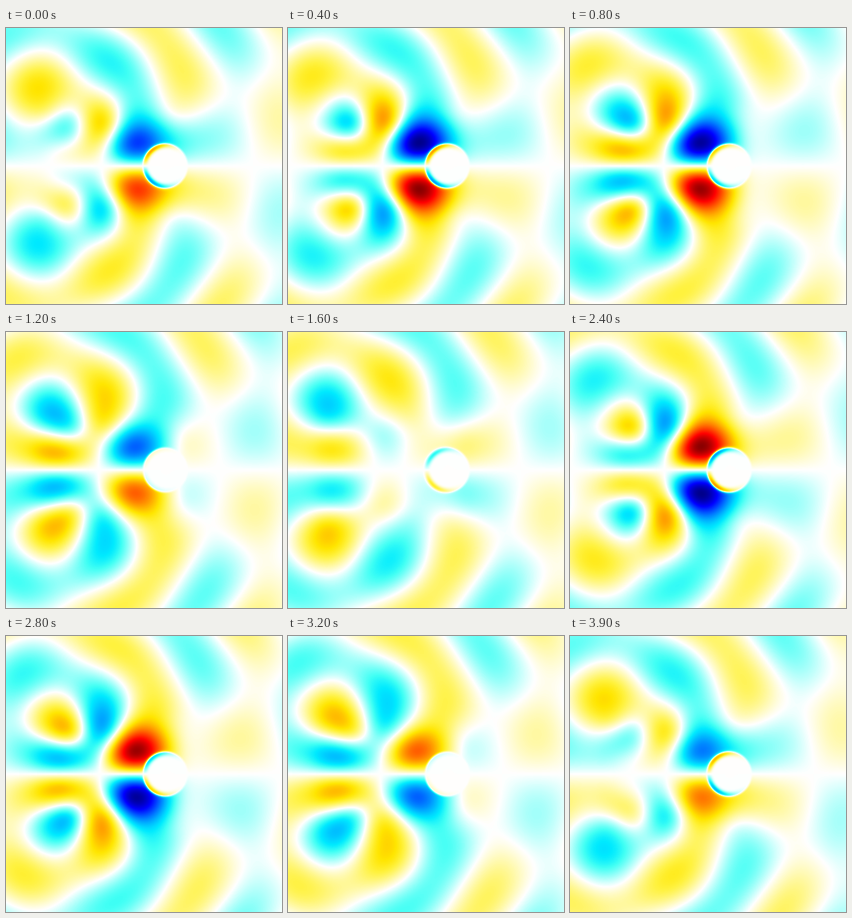
Animation of 400x400 px, one loop 4 s. Source, as a matplotlib script:

```python
import numpy as np
import matplotlib.pyplot as plt
from matplotlib.animation import FuncAnimation
from matplotlib.colors import LinearSegmentedColormap

SIZE = 400
FRAMES = 40
AXIS = 200                      # the field is odd about this row
WAVE_NUMBER = 2 * np.pi / 150
SOURCE_SIZE = 15
LOOSENESS = 0.02
DISC = (231, 200, 31)

# Key points the wave passes through: x, y, amplitude, phase in degrees
KEYS = np.array([
    (175, 170, 1.04, 232), (145, 137, .58, 44), (95, 140, .55, 236),
    (82, 178, .46, 82), (120, 172, .25, 55), (150, 95, .28, 95),
    (195, 125, .22, 222), (62, 90, .27, 330), (15, 175, .18, 115),
    (25, 50, .19, 60), (80, 20, .18, 165), (150, 45, .21, 198),
    (225, 70, .21, 300), (255, 50, .20, 12), (300, 25, .17, 140),
    (285, 155, .12, 145), (345, 135, .10, 268), (385, 120, .085, 10),
])


def wave_from(sx, sy, x, y):
    """Soft circular wave: decays as 1/sqrt(r) away from its source."""
    rho = np.sqrt((x - sx) ** 2 + (y - sy) ** 2 + SOURCE_SIZE ** 2)
    return np.sqrt(SOURCE_SIZE / rho) * np.exp(1j * WAVE_NUMBER * rho)


def odd_wave(sx, sy, x, y):
    return wave_from(sx, sy, x, y) - wave_from(sx, 2 * AXIS - sy, x, y)


def radiated(x, y):
    """Smallest set of source strengths that meets the key points."""
    sources = [(sx, sy) for sx in range(50, 261, 15)
               for sy in range(122, 196, 15)]
    px, py, amp, deg = KEYS.T
    wanted = amp * np.exp(1j * np.radians(deg))
    reach = np.array([odd_wave(sx, sy, px, py) for sx, sy in sources]).T
    gram = reach @ reach.conj().T
    gram += LOOSENESS * np.diag(np.diag(gram))
    strengths = reach.conj().T @ np.linalg.solve(gram, wanted)
    return sum(s * odd_wave(sx, sy, x, y)
               for s, (sx, sy) in zip(strengths, sources))


def with_disc(field, x, y):
    """Clear the disc and add the thin current along its left rim."""
    cx, cy, radius = DISC
    dx, dy = cx - x, cy - y
    r = np.hypot(dx, dy)
    edge = np.clip((r - radius + 1) / 5, 0, 1)
    edge = edge * edge * (3 - 2 * edge)
    angle = np.arctan2(dy, dx)
    lobe = np.sin(angle) * (1 + np.cos(angle)) ** 2 / 2.07
    rim = 0.45 * lobe * np.exp(-((r - radius + 1) / 4) ** 2)
    return field * edge + rim * np.exp(1j * np.radians(24))


cmap = LinearSegmentedColormap.from_list("wave", [
    (0, (0, 0, .5)), (.125, (0, 0, 1)), (.36, (0, .92, 1)),
    (.4, (.25, 1, .96)), (.5, (1, 1, 1)), (.6, (1, .95, .25)),
    (.64, (1, .9, 0)), (.875, (1, 0, 0)), (1, (.5, 0, 0)),
], N=512)

x, y = np.meshgrid(np.arange(SIZE) + 0.5, np.arange(SIZE) + 0.5)
field = with_disc(radiated(x, y), x, y)

fig = plt.figure(figsize=(4, 4), dpi=100)
ax = fig.add_axes([0, 0, 1, 1])
ax.axis("off")
image = ax.imshow(field.real, cmap=cmap, vmin=-1, vmax=1,
                  interpolation="nearest", aspect="auto")


def update(i):
    image.set_data((field * np.exp(-2j * np.pi * i / FRAMES)).real)
    return [image]


anim = FuncAnimation(fig, update, frames=FRAMES, interval=100,
                     repeat=True, repeat_delay=0)
plt.show()
```
